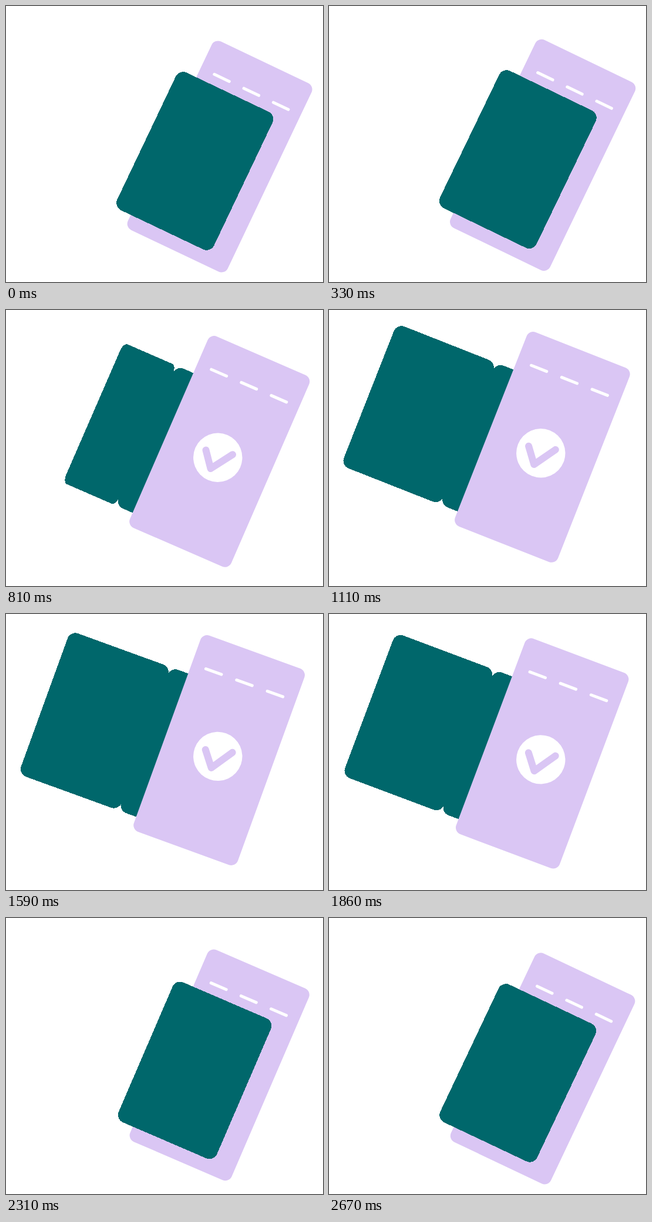
These frames come from a looping animation (540 px wide and 470 px high, 2700 ms). An HTML page:

```html
<!DOCTYPE html>
<html lang="en">
<head>
<meta charset="utf-8">
<title>Opening folder</title>
<style>
  html, body { margin: 0; width: 100%; height: 100%; overflow: hidden; background: #fff; }
  svg { display: block; width: 100%; height: 100%; }
</style>
</head>
<body>
<svg viewBox="0 0 540 470">
  <defs>
    <rect id="panel" y="-115.4" width="182" height="259.6" rx="14" fill="#00676b" shape-rendering="crispEdges"/>
  </defs>
  <g id="folder">
    <use href="#panel" x="-127.7"/>
    <rect x="-95.6" y="-188.4" width="188.4" height="355.6" rx="12" fill="#dac6f4"/>
    <path d="M-70 -133.2h28.2M-14.3 -133.2h28.2M41.4 -133.2h28.2" stroke="#fff" stroke-width="5" stroke-linecap="round"/>
    <circle r="41.7" fill="#fff"/>
    <path d="M-23.7 -3.6L-3.7 22.1L21.1 -14.7" fill="none" stroke="#dac6f4" stroke-width="12" stroke-linecap="round" stroke-linejoin="round"/>
    <use id="flap" href="#panel"/>
  </g>
</svg>
<script>
  const LOOP = 2700, STEP = 30;
  const TURN = 480, OPEN = 483, CLOSE = 1838;
  const folder = document.getElementById('folder');
  const flap = document.getElementById('flap');

  const wave = (t, peak) => Math.cos(2 * Math.PI * (t - peak) / LOOP);
  const ramp = (t, start) => Math.min(1, Math.max(0, (t - start) / TURN));

  function draw(t) {
    const y = 253.9 + 12.8 * wave(t, 45);
    const tilt = 22.9 + 2.95 * wave(t, 225);
    // The flap swings half a turn about its left edge
    const swing = Math.cos(Math.PI * (ramp(t, OPEN) - ramp(t, CLOSE)));
    folder.setAttribute('transform', `translate(360.8 ${y}) rotate(${tilt})`);
    flap.setAttribute('transform', `translate(-127.1 0) scale(${swing} 1)`);
  }

  const begin = performance.now();
  function tick() {
    const t = (performance.now() - begin) % LOOP;
    draw(Math.floor(t / STEP) * STEP);
    requestAnimationFrame(tick);
  }
  tick();
</script>
</body>
</html>
```
